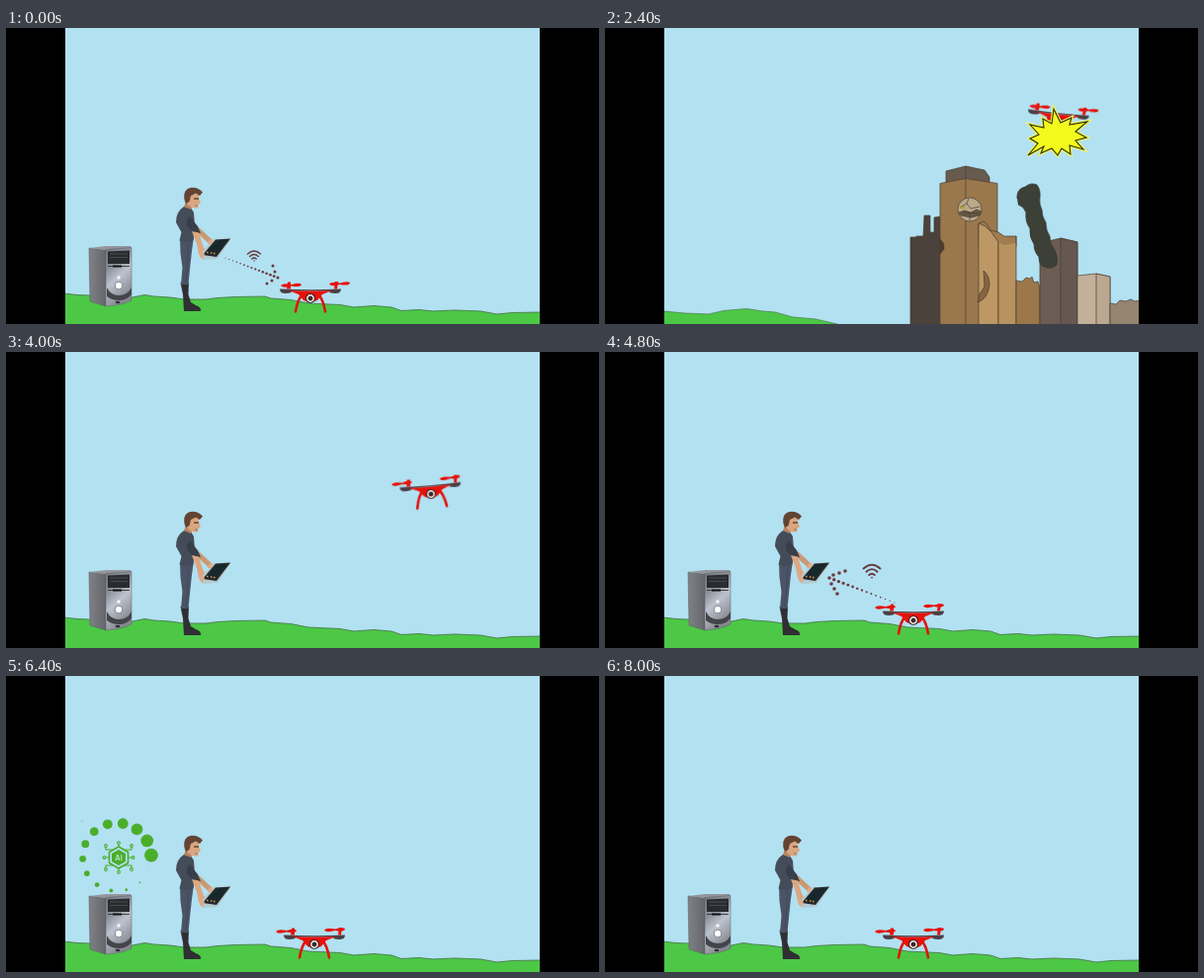
Recreate the animation shown at these times as an HTML page. Size 600 by 300 pixels, loop 8.8 s.

```html
<!DOCTYPE html>
<html lang="en">
<head>
<meta charset="utf-8">
<title>Drone survey</title>
<style>
html, body { margin: 0; width: 100%; height: 100%; overflow: hidden; background: #000; }
svg { display: block; width: 600px; height: 300px; }
/* eleven equal steps of 800 ms */
.field, .city, .pan, .drone, .blade, .send, .reply, .ai, .blast { animation: 8.8s step-end infinite; }
.city, .reply, .ai, .blast { opacity: 0; }
.field { animation-name: field; }
.city { animation-name: city; }
.pan { animation-name: pan; }
.drone { animation-name: fly; }
.blade { animation-name: spin; }
.send { animation-name: send; }
.reply { animation-name: reply; }
.ai { animation-name: ai; }
.blast { animation-name: blast; }
@keyframes field { 27.2727% { opacity: 0 } 45.4545%, to { opacity: 1 } }
@keyframes city { 27.2727% { opacity: 1 } 45.4545%, to { opacity: 0 } }
@keyframes pan { 36.3636%, to { transform: translate(125px, -1px) } }
@keyframes fly {
  0% { transform: translate(308px, 274px) }
  9.0909% { transform: translate(326px, 234px) rotate(4deg) }
  18.1818% { transform: translate(447px, 134px) rotate(6deg) }
  27.2727% { transform: translate(458px, 95px) rotate(6deg) }
  36.3636% { transform: translate(459px, 95px) rotate(-5deg) }
  45.4545% { transform: translate(430px, 144px) rotate(-5deg) }
  54.5454%, to { transform: translate(312px, 272px) }
}
@keyframes spin {
  0%, 27.2727% { transform: translateX(9px) }
  9.0909%, 36.3636%, to { transform: none }
}
@keyframes send { 9.0909%, to { opacity: 0 } }
@keyframes reply { 54.5454% { opacity: 1 } 63.6363%, to { opacity: 0 } }
@keyframes ai { 72.7272% { opacity: 1 } 81.8181%, to { opacity: 0 } }
@keyframes blast { 27.2727% { opacity: 1 } 36.3636%, to { opacity: 0 } }
</style>
</head>
<body>
<svg viewBox="0 0 600 300">
<defs>
  <linearGradient id="side"><stop stop-color="#808186"/><stop offset="1" stop-color="#66676c"/></linearGradient>
  <linearGradient id="front" x2=".4" y2="1"><stop stop-color="#74777e"/><stop offset=".35" stop-color="#8d929b"/><stop offset=".6" stop-color="#bcc3cd"/><stop offset="1" stop-color="#85888f"/></linearGradient>
  <clipPath id="stage"><path d="M60 0h480v300H60z"/></clipPath>
  <g id="wifi" fill="none" stroke="#65363a" stroke-width="1.4" stroke-linecap="round">
    <path d="M-6.5-5Q0-11 6.5-5M-4.3-2.5Q0-6.500 4.300-2.500M-2.200 0Q0-2 2.200 0"/>
    <circle cy="2" r=".7" fill="#65363a" stroke="none"/>
  </g>
  <path id="star" d="M454 82L461 96 472 91 470 98 488 95 476 105 487 111 476 114 484 123 470 119 471 128 462 122 458 129 452 122 441 127 444 120 428 129 438 117 430 112 439 108 430 98 444 101 443 92 452 97z"/>
</defs>
<rect width="600" height="300"/>
<g clip-path="url(#stage)">
<rect x="60" width="480" height="300" fill="#b2e1f2"/>

<g class="field">
  <path d="M58 269L72 270.500 84 271 104 273 128 273 140 270.500 150 272 166 273 180 275 202 275 214 273.500 232 272.500 262 272 268 274 288 275.500 306 279 338 280.500 352 283 372 281.500 390 283 400 286.500 418 285.500 432 287 454 286 480 287 497 290 512 288.500 542 288V302H58z" fill="#4cc846" stroke="#4a7a4c" stroke-width=".9"/>

  <!-- computer -->
  <g>
    <path d="M84 223L101 225V282L85 277z" fill="url(#side)" stroke="#55575c" stroke-width=".5"/>
    <path d="M84 223L101 221H126L127 223 101 225z" fill="#94969b"/>
    <path d="M101 224.500L127 222.500V276Q118 281 101 282z" fill="url(#front)" stroke="#5d6068" stroke-width=".5"/>
    <path d="M103 226.500L125 225.500V239H103z" fill="#292b2f"/>
    <path d="M105 229H123M105 232.500H123" stroke="#50535a" stroke-width=".8"/>
    <path d="M103 241.500H125" stroke="#3c3f45"/>
    <path d="M108 241.500H117" stroke="#111" stroke-width="2"/>
    <path d="M102 263Q106 271 114 271 123 271 127 263V270Q122 276 114 276 107 276 102 272z" fill="#43454a"/>
    <circle cx="114" cy="261" r="4" fill="#7f848d"/>
    <circle cx="114" cy="261" r="3.200" fill="#fff"/>
    <circle cx="114" cy="253" r="1.700" fill="#f6f7f8"/>
    <ellipse cx="113" cy="278" rx="2.400" ry="1.200" fill="#2d3034"/>
  </g>

  <!-- operator -->
  <g>
    <path d="M176.500 258L179 270 180 287H197Q198 283 192 281L187 278 184.500 270 185 258z" fill="#302f33"/>
    <path d="M176 213L190 212 188 226 186.500 240 184.500 260H177L178.500 243 176.500 228z" fill="#4a5466"/>
    <path d="M185 218L182 258" stroke="#3c4556" stroke-width=".7"/>
    <path d="M190 204L195 202 209 215 207 220 198 212z" fill="#cb9872"/>
    <path d="M180 181Q172 186 172 197L177.500 207 175.500 215.500Q182 219 189.500 215L191 200 190 187 187 182z" fill="#454c59"/>
    <path d="M182 176L188 181 187 184 180 181z" fill="#b8845f"/>
    <path d="M183 169L195 167.500 195 172 197 177 194.500 179 194 182.500Q188 183 184 179z" fill="#d9a680"/>
    <path d="M180.500 174Q179 164 186 162 194 160.500 199 166.500L196 170 192 167.500 187 170 185.500 176 182 178z" fill="#634331"/>
    <path d="M190 173H195" stroke="#553626" stroke-width="1.300"/>
    <path d="M191 180H194" stroke="#955d48" stroke-width=".8"/>
    <path d="M186 191Q181 195 184 202L189 207 197 208 194 201 190 196z" fill="#383f4b"/>
    <path d="M188 206L195 207.500 199 220 204 229 200 232 195 229 193 219z" fill="#dca780"/>
    <path d="M196 230L210 214 228 213.500 214 234 199 235z" fill="#b3cbd1"/>
    <path d="M199 230L212 214.500 227 213.500 213 232z" fill="#24282c"/>
    <path d="M204 226L214 216 223 215.500 213 228z" fill="#15282c"/>
    <path d="M203 227.500h1.500M207 228h1.500M210 228.500h1.500" stroke="#d9a04c" stroke-width="1.300"/>
    <path d="M195 225L201 229 199 234 196 232z" fill="#dfab84"/>
    <path d="M206 214L209 215 208 219 204 219z" fill="#dfab84"/>
  </g>

  <g class="send" id="send"><use href="#wifi" transform="translate(251 234)"/></g>
  <g class="reply" id="reply"><use href="#wifi" transform="translate(270 226) scale(1.3)"/></g>

  <g class="ai" fill="#4bae2b">
    <g id="ring"><circle cx="77" cy="147" r=".5"/></g>
    <g fill="none" stroke="#4bae2b" stroke-width="1.100">
      <path d="M114 173L123.500 178.500V189.500L114 195 104.500 189.500V178.500z" stroke-width="1.600"/>
      <path d="M114 173V170M114 195V198M104 184H101M124 184H127M108 176H101V173M120 176H127V173M108 192H101V195M120 192H127V195"/>
      <g id="pins"></g>
    </g>
    <path d="M114 176L121 180V188L114 192 107 188V180z"/>
    <text x="114" y="186.800" text-anchor="middle" font-family="Inter, sans-serif" font-size="7.500" font-weight="600" fill="#b8e5cf">AI</text>
  </g>
</g>

<g class="city"><g class="pan" stroke="#4a3d30" stroke-width=".7" stroke-linejoin="round">
  <path d="M-67 282L-30 281-15 284 10 285 25 287 55 286.500 80 289 105 290 120 286.500 143 284.500 160 287 172 288 190 293 213 295 235 300V302H-67z" fill="#4cc846" stroke="#4a7a4c"/>
  <path d="M309 302V212H315V211H322L323 190H329V207H333V192L340 191V302z" fill="#4c423c"/>
  <path d="M345 157V145L365 140 384 144 389 151V157z" fill="#675a4f"/>
  <path d="M365 140V153" fill="none"/>
  <path d="M339 157.500L365 152.500 397 157.500V302H339z" fill="#9a774c"/>
  <path d="M365 152.500V302" fill="none"/>
  <path d="M339 214Q344 218 343 224L339 229z" fill="#4e3b2c"/>
  <circle cx="369" cy="184" r="12" fill="#baa98b"/>
  <path d="M358 187L364 185 370 187 376 184 381 186 379 190 370 192 360 190z" fill="#655943"/>
  <path d="M359 182L366 178 370 183 379 181M368 173L366 178M362 187L378 188M369 187V195" fill="none"/>
  <path d="M359 182h5" stroke="#a6a22e" stroke-width="1.800"/>
  <path d="M378 198L384 196 390 205 398 207 404 211 416 211V222H378z" fill="#a17c50"/>
  <path d="M378 302V198L385 201 391 207 398 217V302z" fill="#bd9865"/>
  <path d="M398 302V217L404 220 416 218V302z" fill="#b8935f" stroke="none"/>
  <path d="M398 217V302M416 211V302" fill="none"/>
  <path d="M383 246Q389 250 389 261 387 275 377 278L379 270 384 262z" fill="#86643e"/>
  <path d="M416 302V256L422 257 426 253 430 254 432 252 434 258 438 257 440 263V302z" fill="#9b774a"/>
  <path d="M440 302V218L461 213 478 217V302z" fill="#6b5d54"/>
  <path d="M461 213L478 217V302H461z" fill="#665850"/>
  <path d="M478 302V251L497 249 511 252V302z" fill="#c3b09a"/>
  <path d="M497 249L511 252V302H497z" fill="#bca890"/>
  <path d="M511 302V279L517 280 521 276 527 277 532 275 536 277 542 276V302z" fill="#958470"/>
  <path d="M417 173Q416 163 425 161 431 156 437 159 441 164 440 172 439 178 442 184 442 191 446 197 446 205 450 211 450 219 455 225 459 233 457 240 452 245 444 242 439 240 439 232 434 227 434 219 429 212 430 203 425 197 426 187 424 181 418 179 417 173z" fill="#3c4037" stroke="#343a31"/>
</g></g>

<g class="drone">
  <path d="M-8-4Q-13 1-15 13.500M8-4Q13 1 15 13.500" fill="none" stroke="#e0140e" stroke-width="2.600" stroke-linecap="round"/>
  <path d="M-31-9.500Q0-8 31-9.500 31-5 25-5 20-5 18-7.500H-18Q-20-5-25-5-31-5-31-9.500z" fill="#4a3f45"/>
  <path d="M-22-8Q0-7 22-8L12-4 7 2Q0 5-7 2L-12-4z" fill="#e6120b"/>
  <g fill="#e6120b">
    <path d="M-23-16.500H-20V-9.500H-24zM25-17H28L27-9.500H24z"/>
    <g class="blade">
      <path d="M-39-13Q-37-16-28-14 -20-16.500-18-14 -19-11-28-12.500 -37-10-39-13zM10-14.500Q12-17.500 21-15.500 30-18 31-15.500 30-12.500 21-14 12-11.500 10-14.500z"/>
    </g>
  </g>
  <circle r="4.800" fill="#241b1c"/>
  <circle r="3.200" fill="#3b2a2a" stroke="#f6eeee" stroke-width="1.500"/>
</g>

<g class="blast" fill="#f3fb1c">
  <use href="#star" stroke="#eef45a" stroke-width="3.500"/>
  <use href="#star" stroke="#302c0c" stroke-width="1.100"/>
</g>
</g>
</svg>
<script>
const NS = "http://www.w3.org/2000/svg";

function dot(parent, cx, cy, r, fill) {
  const c = document.createElementNS(NS, "circle");
  const attrs = { cx, cy, r };
  if (fill) attrs.fill = fill;
  for (const key in attrs) c.setAttribute(key, attrs[key]);
  parent.append(c);
}

// Dotted shaft that thickens toward its tip, plus the dots of the head.
function arrow(id, [x0, y0], [x1, y1], count, head, size) {
  const g = document.getElementById(id), color = "#69393b";
  for (let i = 0; i < count; i++) {
    const k = i / (count - 1);
    dot(g, x0 + (x1 - x0) * k, y0 + (y1 - y0) * k, 0.5 + (size - 0.5) * k, color);
  }
  for (const [x, y] of head) dot(g, x, y, size, color);
}

arrow("send", [222, 233], [275, 253], 15, [[270, 241], [272, 247], [269, 256], [264, 259]], 1.5);
arrow("reply", [293, 254], [227, 229], 15, [[243, 222], [237, 224], [231, 226], [229, 235], [232, 240], [235, 245]], 1.8);

const ring = document.getElementById("ring");
for (let i = 0; i < 14; i++) {
  const a = (3 + i * 360 / 14) * Math.PI / 180;
  dot(ring, 112.3 + 34.7 * Math.cos(a), 183.5 - 34.5 * Math.sin(a), 6.9 - i / 2);
}

const pins = document.getElementById("pins");
for (const s of [-1, 1]) {
  dot(pins, 114, 184 + s * 14.7, 1.4);
  for (const t of [-1, 0, 1]) dot(pins, 114 + s * (t ? 13 : 14.5), 184 + t * 12, 1.4);
}
</script>
</body>
</html>
```
